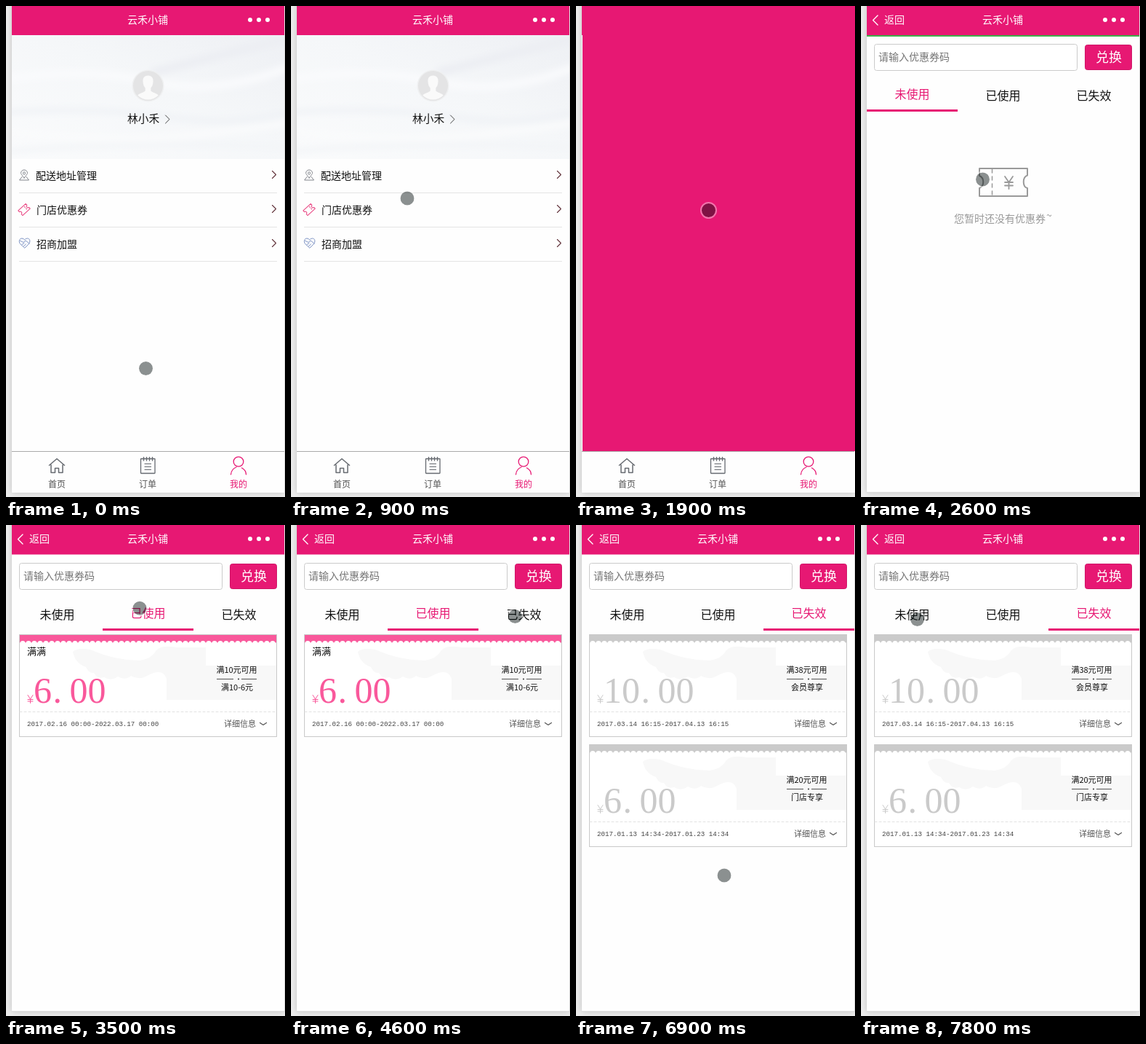
Recreate the animation shown at these times as an HTML page. Size 384x674 px, loop 8 s.

```html
<!DOCTYPE html>
<html lang="zh-CN">
<head>
<meta charset="utf-8">
<title>我的优惠券</title>
<style>
html, body { margin: 0; width: 100%; height: 100%; overflow: hidden; background: #ededed; }
svg { display: block; width: 100vw; height: 100vh; }
text { font-family: "Noto Sans CJK SC", "Noto Sans SC", "Noto Sans CJK", sans-serif; white-space: pre; }
.mono { font-family: "Liberation Mono", monospace; }
.serif { font-family: "Liberation Serif", serif; }
.strong { font-weight: 500; }
.card { filter: drop-shadow(0 0 4px rgba(0, 0, 0, .18)); }
.line { fill: none; stroke-linecap: round; stroke-linejoin: round; }
</style>
</head>
<body>
<svg id="stage" viewBox="0 0 384 674" preserveAspectRatio="none"></svg>
<script>
const PINK = '#e71873';
const LOOP = 8000, TICK = 100;

// ---- drawing helpers ----
const text = (x, mid, size, fill, str, anchor = 'start', cls = '') =>
  `<text x="${x}" y="${mid + size * 0.37}" font-size="${size}" fill="${fill}" text-anchor="${anchor}" class="${cls}">${str}</text>`;
const rect = (x, y, w, h, fill, more = '') =>
  `<rect x="${x}" y="${y}" width="${w}" height="${h}" fill="${fill}" ${more}/>`;
const line = (d, stroke, width = 1, more = '') =>
  `<path class="line" d="${d}" stroke="${stroke}" stroke-width="${width}" ${more}/>`;
const group = (id, body, more = '') => `<g id="${id}" ${more}>${body}</g>`;
const dot = (x, y, r, fill) => `<circle cx="${x}" cy="${y}" r="${r}" fill="${fill}"/>`;

// ---- header ----
const title = text(195, 19, 14, '#fff', '云禾小铺', 'middle', 'strong');
const dots = [336, 348, 360].map(x => dot(x, 19, 3, '#fff')).join('');
const back = line('M23 13L16.500 19.500L23 26', '#fff', 1.400) + text(32, 19, 14, '#fff', '返回', 'start', 'strong');

// ---- profile page ----
const banner = `<g clip-path="url(#bannerClip)">
  ${rect(8, 40, 375, 170, 'url(#sky)')}
  <g filter="url(#soft)" fill="none">
    <path d="M200 92Q300 66 390 44" stroke="#eceef3" stroke-width="12"/>
    <path d="M0 100Q110 84 200 104T390 84" stroke="#fafbfd" stroke-width="10"/>
    <path d="M0 146Q120 138 220 152T390 146" stroke="#eef1f5" stroke-width="6"/>
    <path d="M0 172Q140 190 250 178T390 160" stroke="#fafbfc" stroke-width="9"/>
    <path d="M0 200Q160 184 390 194" stroke="#f2f4f7" stroke-width="6"/>
  </g></g>`;

const avatar = dot(195.5, 109.5, 22, '#eff0f1') + dot(195.5, 109.5, 20.5, '#e4e4e5') +
  `<path d="M195.500 95.500c-5.500 0-7.500 4-7 8.500c.3 4 1.500 7 3.200 8.500v4c-2 2.500-8 3-10.500 6a20 20 0 0 0 28.600 0c-2.500-3-8.500-3.500-10.500-6v-4c1.700-1.500 2.900-4.500 3.200-8.500c.5-4.500-1.500-8.500-7-8.500z" fill="#fafafa"/>`;

const pin = line('M25 236C21.500 231.500 20.500 230 20.500 229.500A4.500 4.500 0 0 1 29.500 229.500C29.500 230 28.500 231.500 25 236Z', '#82858c') +
  line('M22 234.500L18.500 239H31.500L28 234.500', '#82858c') +
  `<circle cx="25" cy="229.500" r="1.600" fill="none" stroke="#82858c"/>`;
const ticket = '<g transform="translate(25 279.500) rotate(-42)">' +
  line('M-7 -4.500H7V-2A2 2 0 0 0 7 2V4.500H-7V2A2 2 0 0 0 -7 -2Z', '#e8407f') +
  line('M3 -3V3', '#e8407f', 1, 'stroke-dasharray="1.5 2"') + '</g>';
const heart = line('M25.500 332L19.500 326.500C17 323 18.500 319 22 319Q24.500 319 25.500 321Q27 319 29.500 319C33 319 34 323.500 31.500 326.500Z', '#7d93c4') +
  line('M19 322L24 324.500L27 322L32 326M22 327.500L25 325.500M24.500 329.500L27.500 327', '#7d93c4');

const arrow = y => line(`M366.500 ${y - 5}L371.500 ${y}L366.500 ${y + 5}`, '#5f3038', 1.1);
const rule = y => rect(18, y, 355, 1, '#e4e4e4');

const profile = rect(8, 0, 375, 668, '#fefefe') + rect(8, 0, 375, 40, PINK) + title + dots +
  banner + avatar + text(167, 155, 14.7, '#111', '林小禾') + line('M219.500 150L225 155.500L219.500 161', '#444') +
  pin + text(41, 233, 14, '#111', '配送地址管理') + arrow(231.5) +
  group('pressed', rect(18, 257, 355, 46, '#ececec')) +
  group('couponRow', ticket + text(42, 280, 14, '#111', '门店优惠券')) + arrow(278.5) +
  heart + text(42, 327, 14, '#111', '招商加盟') + arrow(325.5) +
  [256, 303, 350].map(rule).join('');

// ---- bottom bar ----
const GREY = '#666a70';
const home = line('M59.500 630.500L70 621.500L80.500 630.500M62 630V640.500H67.500V634.500H72.500V640.500H78V630', GREY, 1.500);
const order = line('M186 621.500H204.500Q205 621.500 205 622V641Q205 641.500 204.500 641.500H186Q185.500 641.500 185.500 641V622Q185.500 621.500 186 621.500Z', GREY, 1.300) +
  line('M189.500 619.500V624M193.500 619.500V624M197.500 619.500V624M201.500 619.500V624', GREY, 1.400) +
  line('M191 628.500H199.500M191 632.500H199.500M191 636.500H199.500', GREY, 1.200);
const person = `<ellipse cx="320" cy="625.500" rx="6.800" ry="6.600" fill="none" stroke="${PINK}" stroke-width="1.300"/>` +
  line('M309.500 643C310 638 313 634.500 317 633M324.500 634C328 636 330.500 639 330.500 643', PINK, 1.300);
const bar = rect(8, 611, 376, 57, '#fefefe') + rect(8, 611, 375, 1, '#aaa') + home + order + person +
  text(70, 656.7, 12, '#555', '首页', 'middle') + text(195, 656.7, 12, '#555', '订单', 'middle') +
  text(320, 656.7, 12, PINK, '我的', 'middle');

// ---- coupon page ----
const form = rect(18.5, 52.5, 279, 36, '#fff', 'rx="3" stroke="#cbcbcb"') +
  text(24, 70, 14, '#757575', '请输入优惠券码') +
  rect(308.5, 53.5, 64, 34, PINK, 'rx="3" stroke="#cf1567"') + text(341, 70, 18, '#fff', '兑换', 'middle');
const labels = ['未使用', '已使用', '已失效'];
const tabs = labels.map((s, i) =>
  group('tab' + i, text(70.5 + 125 * i, 123, 16, 'currentColor', s, 'middle'))).join('') +
  rect(8, 142, 125, 3, PINK, 'id="mark"');

const empty = line('M163 223H229V232.500C222 235 222 248 229 250V261H163V250C170 247 170 236 163 233Z', '#9a9a9a', 2) +
  line('M180.500 224V260', '#9a9a9a', 1.500, 'stroke-dasharray="5 5"') +
  line('M198 234L203.500 242L209 234M203.500 242V251M198 242H209M198 246.500H209', '#9a9a9a', 1.800) +
  text(128, 292, 14, '#999', '您暂时还没有优惠券') + text(255, 288, 14, '#999', '~');

const scallops = Array.from({ length: 44 }, (_, i) => dot(23 + i * 8, 162.5, 3.6, '#fff')).join('');
const shade = `<path fill="#f8f8f8" d="M92 174Q98 168 116 171Q150 186 184 186Q200 184 207 172Q214 164 235 168H275V193H372V240H221V211Q216 196 196 206Q184 214 172 207Q164 214 154 208Q144 215 135 209Q126 212 121 203Q114 204 110 195Q95 190 92 174Z"/>`;

const coupon = (dy, c) => `<g transform="translate(0 ${dy})">` +
  rect(18.5, 150.5, 354, 140, '#fff') + shade +
  rect(18, 151, 355, 10.5, c.tint) + `<g clip-path="url(#edge)">${scallops}</g>` +
  rect(18.5, 150.5, 354, 140, 'none', 'stroke="#c9c9c9"') +
  text(29, 173, 13, '#111', c.name) +
  line('M30 233.500L33.500 239L37 233.500M33.500 239V244.500M30 239.500H37M30 242H37', c.tint, 1) +
  `<text class="serif" font-size="50" y="244" fill="${c.tint}"><tspan x="38">${c.yuan}</tspan><tspan dx="1.5">.</tspan><tspan dx="10.5">00</tspan></text>` +
  text(317.5, 199, 11, '#111', c.rule, 'middle') + text(318, 223, 11, '#111', c.offer, 'middle') +
  rect(290, 211, 23, 1, '#555') + rect(324, 211, 21, 1, '#555') + dot(320, 211.5, 1, '#333') +
  line('M19 256.500H372', '#e2e2e2', 1, 'stroke-dasharray="3 3"') +
  text(29, 273, 9.17, '#444', c.dates, 'start', 'mono') +
  text(300, 273, 11, '#555', '详细信息') + line('M349.500 271.500L354 274.500L358.500 271.500', '#555', 1.2) + '</g>';

const used = coupon(0, { tint: '#f9589b', yuan: 6, name: '满满', rule: '满10元可用', offer: '满10-6元',
  dates: '2017.02.16 00:00-2022.03.17 00:00' });
const expired = coupon(0, { tint: '#cacaca', yuan: 10, name: '', rule: '满38元可用', offer: '会员尊享',
  dates: '2017.03.14 16:15-2017.04.13 16:15' }) +
  coupon(151, { tint: '#cacaca', yuan: 6, name: '', rule: '满20元可用', offer: '门店专享',
  dates: '2017.01.13 14:34-2017.01.23 14:34' });

const lists = [empty, used, expired].map((s, i) => group('list' + i, s)).join('');
const coupons = rect(8, 40, 375, 627, '#fefefe') + rect(8, 40, 375, 1, PINK, 'opacity=".5"') +
  rect(8, 667, 375, 1, '#dedede') + form + tabs + lists;

document.getElementById('stage').innerHTML = `<defs>
  <linearGradient id="sky" x1="0" y1="1" x2="1" y2="0">
    <stop offset="0" stop-color="#fafbfc"/><stop offset=".55" stop-color="#f5f7f9"/><stop offset="1" stop-color="#eef0f4"/>
  </linearGradient>
  <filter id="soft" x="-10%" y="-30%" width="120%" height="160%"><feGaussianBlur stdDeviation="5"/></filter>
  <clipPath id="bannerClip"><rect x="8" y="40" width="375" height="170"/></clipPath>
  <clipPath id="edge"><rect x="19" y="150" width="353" height="12"/></clipPath>
</defs>` +
  rect(0, 0, 384, 674, '#ededed') + rect(8, -20, 375, 688, '#fefefe', 'class="card"') +
  group('profile', profile) +
  rect(0, 0, 376, 668, PINK, 'id="cover"') +
  group('bar', bar) +
  group('coupons', coupons) +
  group('head', rect(8, 0, 375, 40, PINK) + back + title + dots) +
  rect(8, 40, 30, 2, '#3fae49', 'id="progress"') +
  rect(383, 0, 1, 668, '#dedede', 'id="side"') +
  group('cursor', dot(0, 0, 9.5, 'rgba(0,12,12,.45)') +
    '<circle r="10.500" fill="none" stroke="#fff" stroke-opacity=".4" stroke-width="2"/>');

// ---- timeline: [time, x, y] ----
const path = [
  [100, 192.5, 497.5], [300, 170, 470], [500, 120, 400], [600, 102, 360], [700, 110, 315], [900, 160, 264],
  [1000, 175, 259], [1100, 177, 264], [1300, 182.5, 280.5],
  [2400, 182.5, 280.5], [2500, 176, 262], [2600, 167.5, 238], [3000, 169, 146], [3300, 174, 101], [3600, 189, 121],
  [3700, 189, 121], [4100, 321, 121], [4300, 321, 121], [4600, 308.5, 125.5],
  [5000, 308.5, 125.5], [5100, 316, 125.5], [5300, 315, 125.5], [5700, 308.5, 148.5],
  [6000, 308.5, 148.5], [6100, 300, 166], [6400, 240, 310], [6700, 199, 463], [6800, 198, 480],
  [6900, 204, 481], [7000, 218, 455], [7200, 190, 360], [7500, 105, 180], [7700, 82, 127.5], [7800, 77.5, 129.5]
];
const slide = [[1600, 384], [1700, 326], [1800, 120], [1900, 9], [2000, 8]];

// Linear reading of a table of [time, ...values]
function at(rows, t) {
  const i = rows.findIndex(r => r[0] > t);
  if (i === 0) return rows[0].slice(1);
  if (i < 0) return rows[rows.length - 1].slice(1);
  const a = rows[i - 1], b = rows[i], k = (t - a[0]) / (b[0] - a[0]);
  return a.slice(1).map((v, j) => v + (b[j + 1] - v) * k);
}

const el = id => document.getElementById(id);
const show = (id, on) => el(id).style.display = on ? '' : 'none';

function draw(t) {
  const [x, y] = at(path, t), [left] = at(slide, t);
  el('cursor').setAttribute('transform', `translate(${x} ${y})`);
  el('cover').setAttribute('x', left);
  show('cover', t >= 1700 && t < 2500);
  show('side', t < 1700 || t >= 2500);
  show('pressed', t >= 1700);
  el('couponRow').setAttribute('opacity', t >= 1700 ? 0.65 : 1);
  show('profile', t < 2000);
  show('bar', t < 2000);
  show('head', t >= 2100);
  show('coupons', t >= 2500);
  show('progress', t >= 2300 && t < 2800);
  el('progress').setAttribute('width', t < 2500 ? 30 : 375);

  const active = t < 3200 ? 0 : t < 5500 ? 1 : 2;
  for (let i = 0; i < 3; i++) {
    const on = i === active, tab = el('tab' + i);
    tab.style.color = on ? PINK : '#111';
    tab.setAttribute('transform', `translate(0 ${on ? -1.5 : 0})`);
    show('list' + i, on);
  }
  el('mark').setAttribute('x', 8 + 125 * active);
}

const start = performance.now();
function frame() {
  const t = (performance.now() - start) % LOOP;
  draw(Math.floor(t / TICK) * TICK);
  requestAnimationFrame(frame);
}
draw(0);
requestAnimationFrame(frame);
</script>
</body>
</html>
```
